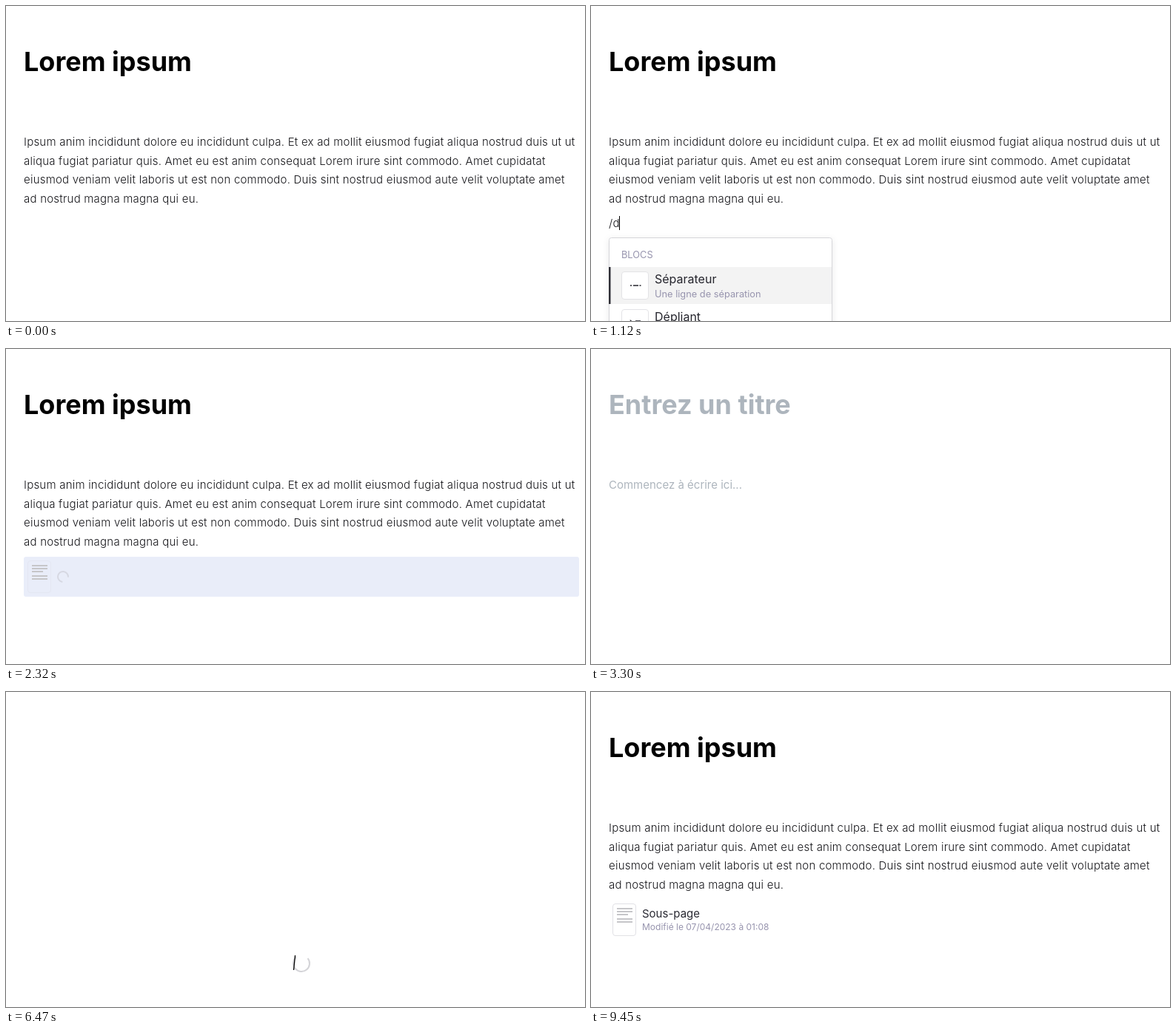
These frames come from a looping animation (782 by 426 pixels, 9.86 s). An HTML page:

```html
<!DOCTYPE html>
<html lang="fr">
<head>
<meta charset="utf-8">
<style>
  html, body { margin: 0; width: 100%; height: 100%; overflow: hidden; background: #fff; }
  svg { display: block; width: 782px; height: 426px; font-family: Inter, sans-serif; }
  text { white-space: pre; }
  .title { font-size: 36px; font-weight: 700; }
  .body { font-size: 15px; font-weight: 300; letter-spacing: .22px; fill: #17171b; }
  .hint { fill: #adb5bd; }
  .name { font-size: 16px; fill: #25252d; }
  .note { font-size: 12.8px; fill: #9794ae; }
  .ring { fill: none; stroke-width: 2; }
</style>
</head>
<body>
<svg viewBox="0 0 782 426">
  <defs>
    <filter id="soft" x="-10%" y="-10%" width="120%" height="130%">
      <feDropShadow dx="0" dy="2" stdDeviation="4" flood-opacity=".09"/>
    </filter>
  </defs>

  <g id="page">
    <text class="title" id="heading" x="24" y="88">Lorem ipsum</text>
    <g class="body">
      <text x="24" y="189">Ipsum anim incididunt dolore eu incididunt culpa. Et ex ad mollit eiusmod fugiat aliqua nostrud duis ut ut</text>
      <text x="24" y="215">aliqua fugiat pariatur quis. Amet eu est anim consequat Lorem irure sint commodo. Amet cupidatat</text>
      <text x="24" y="240">eiusmod veniam velit laboris ut est non commodo. Duis sint nostrud eiusmod aute velit voluptate amet</text>
      <text x="24" y="266">ad nostrud magna magna qui eu.</text>
      <text id="command" x="24" y="299"></text>
    </g>
    <g id="handle" fill="#b4b4bc"></g>
  </g>

  <g id="menu">
    <rect id="panel" x="24.5" y="313.5" width="301" rx="3" fill="#fff" stroke="#d6d6da" filter="url(#soft)"/>
    <text class="note" x="41" y="341">BLOCS</text>
    <rect x="25" y="353" width="300" height="50" fill="#f3f3f3"/>
    <rect x="24" y="353" width="2.5" height="50" fill="#2f2f36"/>
    <g id="items"></g>
  </g>

  <g id="block">
    <rect id="picked" x="24" y="281" width="750" height="54" rx="3" fill="#e9edf9"/>
    <rect id="sheet" x="29.5" y="286.5" width="31" height="43" rx="3.5"/>
    <path d="M35 293H56M35 297H56M35 301H50M35 307H56M35 311H56" stroke="#c6c6c9" stroke-width="2"/>
    <g id="info">
      <text x="69" y="305" font-size="15" fill="#2a2a33">Sous-page</text>
      <text x="69" y="322" font-size="12" fill="#9794ae">Modifié le 07/04/2023 à 01:08</text>
    </g>
    <path id="smallSpin" class="ring" stroke="#d6d8e2"/>
  </g>

  <g id="sub">
    <text class="title" id="subTitle" x="24" y="88"></text>
    <text class="hint" x="24" y="189" font-size="15">Commencez à écrire ici...</text>
  </g>

  <g id="loader">
    <path id="bigSpin" class="ring" stroke="#d4d4d8"/>
    <path id="tilted" d="M-9.5 -10V10" stroke="#000" stroke-width="1.3"/>
  </g>
  <rect id="caret" width="1"/>
</svg>
<script>
const LOOP = 9860;
const $ = Object.fromEntries([...document.querySelectorAll('[id]')].map(el => [el.id, el]));

const ENTER = 1930, LEAVE = 2330, SUB_READY = 2770;
const BACK = 6430, PAGE_READY = 6850, BLOCK_READY = 7010;
const COMMAND = '/document', SUB_NAME = 'Sous-page';
const commandKeys = [80, 1120, 1190, 1360, 1430, 1500, 1580, 1650, 1720];
const subKeys = [3370, 3480, 3590, 3700, 3810, 3970, 4050, 4130, 4210];

// Pairs of on and off times
const caretOn = [[80, 590], [1120, ENTER], [SUB_READY, 3300], [3370, 4770], [5290, 5820],
  [6350, BACK], [PAGE_READY, 7370], [7890, 8400], [8930, 9450]];

const icons = {
  rule: 'M53 378h2M57 378h7M65.500 378h2',
  fold: 'M53.500 374.500l4 3l-4 3zM60 375h7M60 380h7',
  doc: 'M54 373h12M54 377h12M54 381h8',
  grid: 'M54 373h12v10h-12zM54 378h12M60 373v10'
};
const rule = ['rule', 'Séparateur', 'Une ligne de séparation'];
const fold = ['fold', 'Dépliant', 'Un bloc à déplier'];
const doc = ['doc', 'Document', 'Une page dans la page'];
const grid = ['grid', 'Tableau de données', 'Un tableau à remplir'];

const between = (t, a, b) => t >= a && t < b;
const show = (el, on) => el.style.display = on ? '' : 'none';
const fade = (t, a, b) => Math.min(1, Math.max(0, (t - a) / (b - a)));
const typed = (text, keys, t) => text.slice(0, keys.filter(k => t >= k).length);
const arc = r => {
  const d = r * Math.SQRT1_2;
  return `M${d} ${-d}A${r} ${r} 0 1 1 ${-d} ${-d}`;
};
const setText = (el, text) => { if (el.textContent !== text) el.textContent = text; };

$.smallSpin.setAttribute('d', arc(7));
$.bigSpin.setAttribute('d', arc(11));
for (let i = 0; i < 6; i++)
  $.handle.innerHTML += `<circle cx="${7.5 + i % 2 * 5}" cy="${179 + (i >> 1) * 5}" r="1.4"/>`;

let listed;
function setMenu(list) {
  const key = list.map(item => item[0]).join();
  if (key === listed) return;
  listed = key;
  $.panel.setAttribute('height', list.length > 1 ? 150 : 98);
  $.items.innerHTML = list.map(([icon, name, note], i) => `
    <g transform="translate(0 ${i * 51})">
      <rect x="41.5" y="359.5" width="36" height="37" rx="3.5" fill="#fff" stroke="#e3e3e6"/>
      <path d="${icons[icon]}" fill="none" stroke="#25252d" stroke-width="1.4"/>
      <text class="name" x="86" y="375">${name}</text>
      <text class="note" x="86" y="394">${note}</text>
    </g>`).join('');
}

function placeCaret(el, top, height) {
  const width = el && el.textContent ? el.getComputedTextLength() : 0;
  $.caret.setAttribute('x', Math.floor(24 + width));
  $.caret.setAttribute('y', top);
  $.caret.setAttribute('height', height);
}

function render(t) {
  const onSub = between(t, SUB_READY, BACK);
  const loading = between(t, LEAVE, SUB_READY) || between(t, BACK, PAGE_READY);
  const pending = between(t, ENTER, LEAVE);

  show($.page, !onSub && !loading);
  show($.sub, onSub);
  show($.loader, loading);
  show($.block, pending || t >= BLOCK_READY);
  show($.menu, between(t, 80, ENTER));

  setText($.command, t < ENTER ? typed(COMMAND, commandKeys, t) : '');
  setMenu(t < 1190 ? [rule, fold] : t < 1360 ? [doc, grid] : [doc]);
  $.menu.style.opacity = fade(t, 110, 350);

  show($.picked, pending);
  show($.smallSpin, pending);
  show($.info, !pending);
  $.sheet.setAttribute('fill', pending ? 'none' : '#fff');
  $.sheet.setAttribute('stroke', pending ? '#e4e7f2' : '#e1e1e5');
  $.smallSpin.setAttribute('transform', `translate(77 308) rotate(${(t - ENTER) * .36})`);

  const spinStart = t < BACK ? LEAVE : 6455;
  $.loader.setAttribute('transform', `translate(399 367) rotate(${(t - spinStart) * .36})`);
  show($.tilted, t >= BACK);

  const name = typed(SUB_NAME, subKeys, t);
  setText($.subTitle, name || 'Entrez un titre');
  $.subTitle.classList.toggle('hint', !name);

  $.handle.style.opacity = fade(t, 7610, 7730) - fade(t, 8890, 9090);

  show($.caret, caretOn.some(([a, b]) => between(t, a, b)));
  if (t < ENTER) placeCaret($.command, 284, 19);
  else if (!onSub) placeCaret($.heading, 53, 44);
  else placeCaret(name && $.subTitle, 53, 44);
}

function tick() {
  render(performance.now() % LOOP);
  requestAnimationFrame(tick);
}
tick();
</script>
</body>
</html>
```
